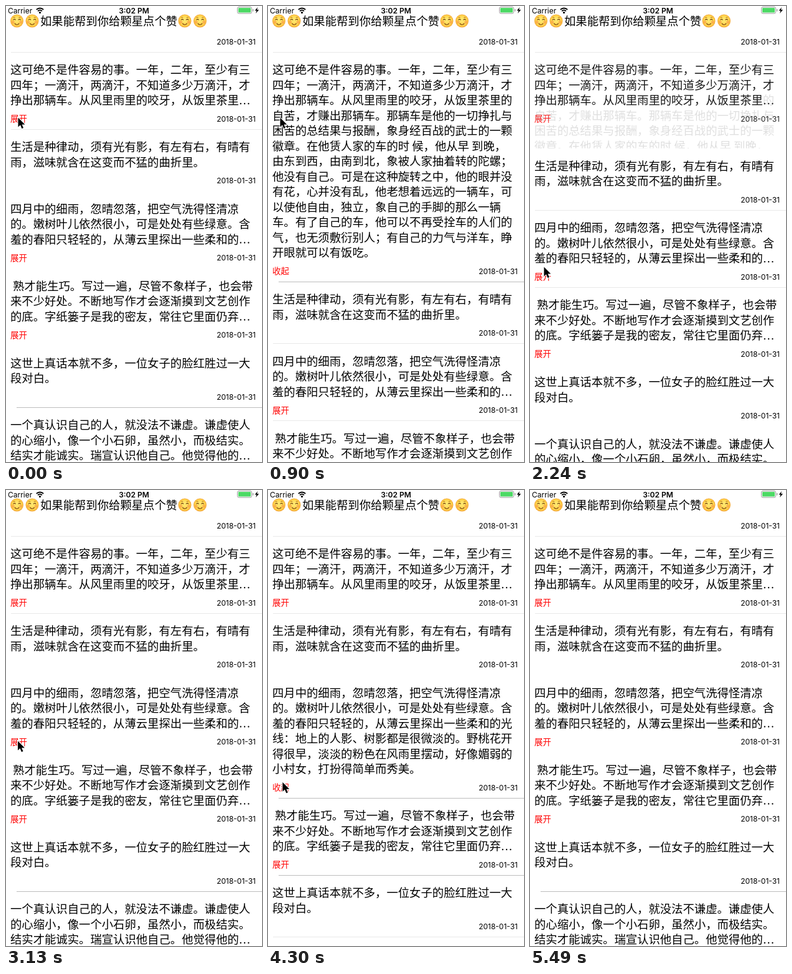
An HTML page with a canvas that plays this animation: 411x733 px, repeating every 5990 ms.

```html
<!DOCTYPE html>
<html lang="zh-CN">
<head>
<meta charset="utf-8">
<style>
html, body { margin: 0; width: 100%; height: 100%; overflow: hidden; background: #fff; }
canvas { display: block; }
</style>
</head>
<body>
<canvas id="stage" width="411" height="733"></canvas>
<script>
const ctx = document.getElementById('stage').getContext('2d');
const LOOP = 5990, WIDTH = 411, HEIGHT = 733;
const STEP = 146.5;                      // the picture advances in steps of this many ms
const EM = 18.35, LINE = 24.5, MARGIN = 7, LIST_TOP = 74;
const CJK = '"Noto Sans CJK SC", "Noto Sans CJK", sans-serif';
const LATIN = 'Inter, sans-serif';

// "more" continues a text after its ellipsis; "rules" gives the separator
// below each cell while this one is open: l light, d dark, - none.
const CLOSED_RULES = 'l---d';
const cells = [
  { lines: ['这可绝不是件容易的事。一年，二年，至少有三', '四年；一滴汗，两滴汗，不知道多少万滴汗，才', '挣出那辆车。从风里雨里的咬牙，从饭里茶里…'],
    more: ['的', '自苦，才赚出那辆车。那辆车是他的一切挣扎与', '困苦的总结果与报酬，象身经百战的武士的一颗',
      '徽章。在他赁人家的车的时 候，他从早 到晚，', '由东到西，由南到北，象被人家抽着转的陀螺；',
      '他没有自己。可是在这种旋转之中，他的眼并没', '有花，心并没有乱，他老想着远远的一辆车，可',
      '以使他自由，独立，象自己的手脚的那么一辆', '车。有了自己的车，他可以不再受拴车的人们的',
      '气，也无须敷衍别人；有自己的力气与洋车，睁', '开眼就可以有饭吃。'],
    rules: 'dll' },
  { lines: ['生活是种律动，须有光有影，有左有右，有晴有', '雨，滋味就含在这变而不猛的曲折里。'] },
  { lines: ['四月中的细雨，忽晴忽落，把空气洗得怪清凉', '的。嫩树叶儿依然很小，可是处处有些绿意。含', '羞的春阳只轻轻的，从薄云里探出一些柔和的…'],
    more: ['光', '线：地上的人影、树影都是很微淡的。野桃花开', '得很早，淡淡的粉色在风雨里摆动，好像媚弱的', '小村女，打扮得简单而秀美。'],
    rules: 'l-ddl' },
  { lines: [' 熟才能生巧。写过一遍，尽管不象样子，也会带', '来不少好处。不断地写作才会逐渐摸到文艺创作', '的底。字纸篓子是我的密友，常往它里面仍弃…'] },
  { lines: ['这世上真话本就不多，一位女子的脸红胜过一大', '段对白。'] },
  { lines: ['一个真认识自己的人，就没法不谦虚。谦虚使人', '的心缩小，像一个小石卵，虽然小，而极结实。', '结实才能诚实。瑞宣认识他自己。他觉得他的…'] }
];

for (const cell of cells.filter(c => c.more)) {
  const [tail, ...rest] = cell.more;
  const kept = cell.lines.map(line => line.replace('…', tail));
  cell.full = [...kept, ...rest];
}

const visits = [
  { cell: cells[0], opens: 750, closes: 2240 },
  { cell: cells[2], opens: 3420, closes: 4450 }
];

// The pointer goes to each point in turn, bowing to the right by "bow".
const home = { x: 19, y: 179 };
const moves = [
  { start: 1350, steps: 5, x: 22, y: 419, bow: 32 },
  { start: 2690, steps: 4, x: 18.5, y: 403, bow: 5 },
  { start: 3720, steps: 5, x: 22, y: 477, bow: 4 },
  { start: 4750, steps: 6, x: 450, y: 540, bow: 0 }
];

const clamp = v => Math.min(1, Math.max(0, v));
const stepped = (t, start, steps) => clamp((Math.floor((t - start) / STEP) + 1) / steps);
const easeOut = p => 1 - (1 - p) ** 3;
const smooth = p => p * p * (3 - 2 * p);
const heightOf = lines => 75 + LINE * (lines.length - 1);

function opennessAt(t, { opens, closes }) {
  return easeOut(stepped(t, opens, 2)) - easeOut(stepped(t, closes, 2));
}

function pointerAt(t) {
  return moves.reduce((from, { start, steps, x, y, bow }) => {
    const p = smooth(stepped(t, start, steps));
    return {
      x: from.x + (x - from.x) * p + bow * Math.sin(Math.PI * p),
      y: from.y + (y - from.y) * p
    };
  }, home);
}

function text(str, x, y, font, color = '#000', align = 'left') {
  ctx.font = font;
  ctx.fillStyle = color;
  ctx.textAlign = align;
  ctx.fillText(str, x, y);
}

function disc(x, y, r, color) {
  ctx.fillStyle = color;
  ctx.beginPath();
  ctx.arc(x, y, r, 0, Math.PI * 2);
  ctx.fill();
}

function arc(x, y, r, from, to, color, width) {
  ctx.strokeStyle = color;
  ctx.lineWidth = width;
  ctx.beginPath();
  ctx.arc(x, y, r, from * Math.PI, to * Math.PI);
  ctx.stroke();
}

function bodyLine(str, x, centerY) {
  const words = str.replace('…', '');
  text(words, x, centerY + 7, `${EM}px ${CJK}`);
  if (words === str) return;
  const dots = x + words.length * EM + 2.8;
  for (let i = 0; i < 3; i++) disc(dots + i * 6.3, centerY + 6, 1.15, '#000');
}

function date(centerY) {
  text('2018-01-31', 401, centerY + 4.5, `12px ${LATIN}`, '#000', 'right');
}

function cellContent(lines, link, y, alpha) {
  ctx.globalAlpha = alpha;
  lines.forEach((line, i) => bodyLine(line, MARGIN, y + 28 + i * LINE));
  const footer = y + heightOf(lines) - 17;
  text(link, MARGIN, footer + 5, `13.5px ${CJK}`, '#f00');
  date(footer);
  ctx.globalAlpha = 1;
}

function separator(kind, y) {
  const dark = kind === 'd';
  if (!dark && kind !== 'l') return;
  const x = dark ? 17 : 8;
  ctx.fillStyle = dark ? '#bdbdbd' : '#e9e9e9';
  ctx.fillRect(x, Math.floor(y), WIDTH - x, 1);
}

function smiley(x, y) {
  const skin = ctx.createRadialGradient(x, y - 2, 2, x, y, 10.5);
  skin.addColorStop(0, '#ffe76e');
  skin.addColorStop(0.75, '#fed148');
  skin.addColorStop(1, '#f2a136');
  disc(x, y, 10.5, skin);
  for (const side of [-1, 1]) {
    disc(x + side * 6.3, y + 2, 2.4, 'rgba(246,120,70,.4)');
    arc(x + side * 4, y - 0.8, 1.9, 1.1, 1.9, '#6b3d10', 1.2);
    arc(x + side * 4.4, y - 3.6, 2.2, 1.25, 1.75, '#a86a22', 0.9);
  }
  arc(x, y + 2, 4, 0.15, 0.85, '#7a3f12', 1.2);
}

function statusBar() {
  text('Carrier', 3, 11.5, `12px ${LATIN}`);
  text('3:02 PM', 205.5, 11.5, `600 12px ${LATIN}`, '#000', 'center');
  for (const r of [4.7, 8]) arc(54.5, 11.5, r, 1.25, 1.75, '#000', 2);
  disc(54.5, 10.6, 1.6, '#000');

  ctx.strokeStyle = '#999';
  ctx.lineWidth = 1;
  ctx.beginPath();
  ctx.roundRect(371.5, 1.5, 23, 10.5, 2.5);
  ctx.stroke();
  ctx.fillStyle = '#4cd964';
  ctx.beginPath();
  ctx.roundRect(373, 3, 20, 7.5, 1.2);
  ctx.fill();
  ctx.fillStyle = '#999';
  ctx.fillRect(396, 5, 1.3, 3.6);
  ctx.fillStyle = '#000';
  ctx.fill(new Path2D('M404 2l-4.5 5.6h2.8L401 12l5-6.1h-3z'));
}

function header() {
  [17.5, 42, 287, 311.5].forEach(x => smiley(x, 24));
  bodyLine('如果能帮到你给颗星点个赞', 55, 24);
  date(57);
  separator('l', LIST_TOP);
}

function list(t) {
  const active = visits.find(visit => opennessAt(t, visit) > 0);
  const openness = active ? opennessAt(t, active) : 0;
  const rules = active ? active.cell.rules : CLOSED_RULES;
  let y = LIST_TOP;
  cells.forEach((cell, i) => {
    const isActive = cell === active?.cell;
    const open = isActive ? openness : 0;
    const closedHeight = heightOf(cell.lines);
    const height = closedHeight + (isActive ? open * (heightOf(cell.full) - closedHeight) : 0);
    ctx.save();
    ctx.beginPath();
    ctx.rect(0, y, WIDTH, height);
    ctx.clip();
    if (open < 1) cellContent(cell.lines, cell.lines.length > 2 ? '展开' : '', y, 1 - open);
    if (open > 0) cellContent(cell.full, '收起', y, open);
    ctx.restore();
    y += height;
    const moving = open > 0 && open < 1;
    if (!moving) separator(rules[i], y);
  });
}

const arrow = new Path2D('M.5 .5v15l3.5-3.2 2.4 5.7 2.6-1-2.4-5.6h4.8z');

function cursor({ x, y }) {
  ctx.save();
  ctx.translate(x, y);
  ctx.lineJoin = 'round';
  ctx.lineWidth = 2;
  ctx.strokeStyle = '#fff';
  ctx.stroke(arrow);
  ctx.fillStyle = '#000';
  ctx.fill(arrow);
  ctx.restore();
}

function draw(t) {
  ctx.fillStyle = '#fff';
  ctx.fillRect(0, 0, WIDTH, HEIGHT);
  header();
  statusBar();
  list(t);
  cursor(pointerAt(t));
}

const start = performance.now();
function tick() {
  draw((performance.now() - start) % LOOP);
  requestAnimationFrame(tick);
}
tick();
</script>
</body>
</html>
```
